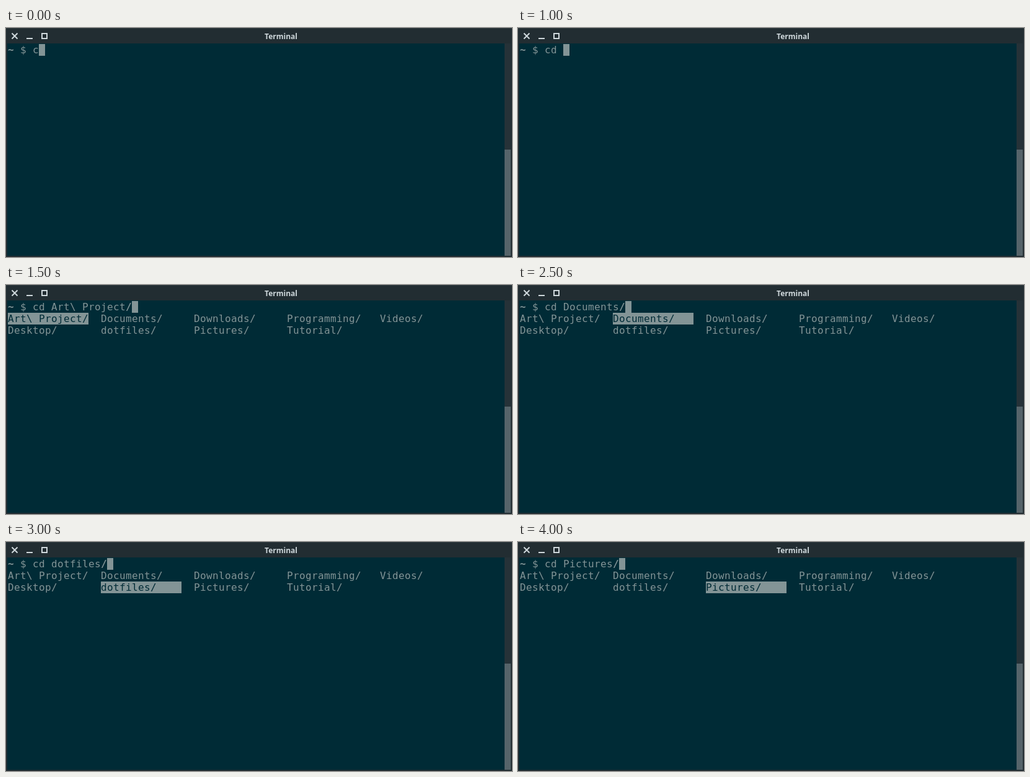
These frames come from a looping animation (816 by 371 pixels, 4500 ms). An HTML page with a canvas:

```html
<!DOCTYPE html>
<html lang="en">
<head>
<meta charset="utf-8">
<title>Terminal</title>
<style>
  html, body { margin: 0; width: 100%; height: 100%; overflow: hidden; background: #002b36; }
  canvas { display: block; }
</style>
</head>
<body>
<canvas id="stage" width="816" height="371"></canvas>
<script>
const ctx = document.getElementById('stage').getContext('2d');

const STEP = 500;
const CELL_W = 10, CELL_H = 19, LEFT = 3, TOP = 26, BASELINE = 15;
const COLUMN = 15, ENTRY = 13, ROWS = 2;
const BG = '#002b36', FG = '#839496', FRAME = '#222d32', ICON = '#cfd8dc';
const MONO = '16px "DejaVu Sans Mono", monospace';

const folders = ['Art\\ Project/', 'Desktop/', 'Documents/', 'dotfiles/', 'Downloads/',
  'Pictures/', 'Programming/', 'Tutorial/', 'Videos/'];
const typed = ['c', 'cd', 'cd '];
const TAB_PRESSES = 6;
const LOOP = STEP * (typed.length + TAB_PRESSES);

function rect(x, y, w, h, color) {
  ctx.fillStyle = color;
  ctx.fillRect(x, y, w, h);
}

function cells(col, row, count) {
  rect(LEFT + col * CELL_W, TOP + row * CELL_H, count * CELL_W, CELL_H, FG);
}

// Terminal text sits on a fixed character grid.
function write(text, col, row, color = FG, bold = false) {
  ctx.font = (bold ? 'bold ' : '') + MONO;
  ctx.textAlign = 'left';
  ctx.fillStyle = color;
  [...text].forEach((char, i) =>
    ctx.fillText(char, LEFT + (col + i) * CELL_W, TOP + row * CELL_H + BASELINE));
}

function drawWindow() {
  rect(0, 0, 816, 371, FRAME);
  rect(0, 0, 816, 1, '#2d383d');
  rect(2, 25, 802, 344, BG);
  rect(804, 25, 10, 172, '#263238');
  rect(804, 197, 10, 172, '#56646a');

  ctx.strokeStyle = ICON;
  ctx.lineWidth = 2;
  ctx.beginPath();
  ctx.moveTo(9.5, 8.5);
  ctx.lineTo(18.5, 17.5);
  ctx.moveTo(18.5, 8.5);
  ctx.lineTo(9.5, 17.5);
  ctx.stroke();
  rect(33, 16, 10, 2, ICON);
  ctx.strokeRect(58, 9, 8, 8);

  ctx.font = 'bold 12px "Noto Sans", sans-serif';
  ctx.textAlign = 'center';
  ctx.fillStyle = ICON;
  ctx.fillText('Terminal', 443.5, 18);
}

function drawMenu(selected) {
  folders.forEach((name, i) => {
    const col = Math.floor(i / ROWS) * COLUMN;
    const row = 1 + i % ROWS;
    if (i === selected) cells(col, row, ENTRY);
    write(name, col, row, i === selected ? BG : FG);
  });
}

function draw(now) {
  const step = Math.floor((now % LOOP) / STEP);
  const selected = step - typed.length;
  const completing = selected >= 0;
  const command = completing ? 'cd ' + folders[selected] : typed[step];
  const end = 4 + command.length;

  drawWindow();
  write('~', 0, 0, FG, true);
  write('$', 2, 0);
  write(completing ? command.slice(0, -1) : command, 4, 0);
  if (completing) {
    write('/', end - 1, 0, FG, true);
    drawMenu(selected);
  }
  cells(end, 0, 1);
}

let start;
function tick(now) {
  start ??= now;
  draw(now - start);
  requestAnimationFrame(tick);
}
draw(0);
requestAnimationFrame(tick);
</script>
</body>
</html>
```
